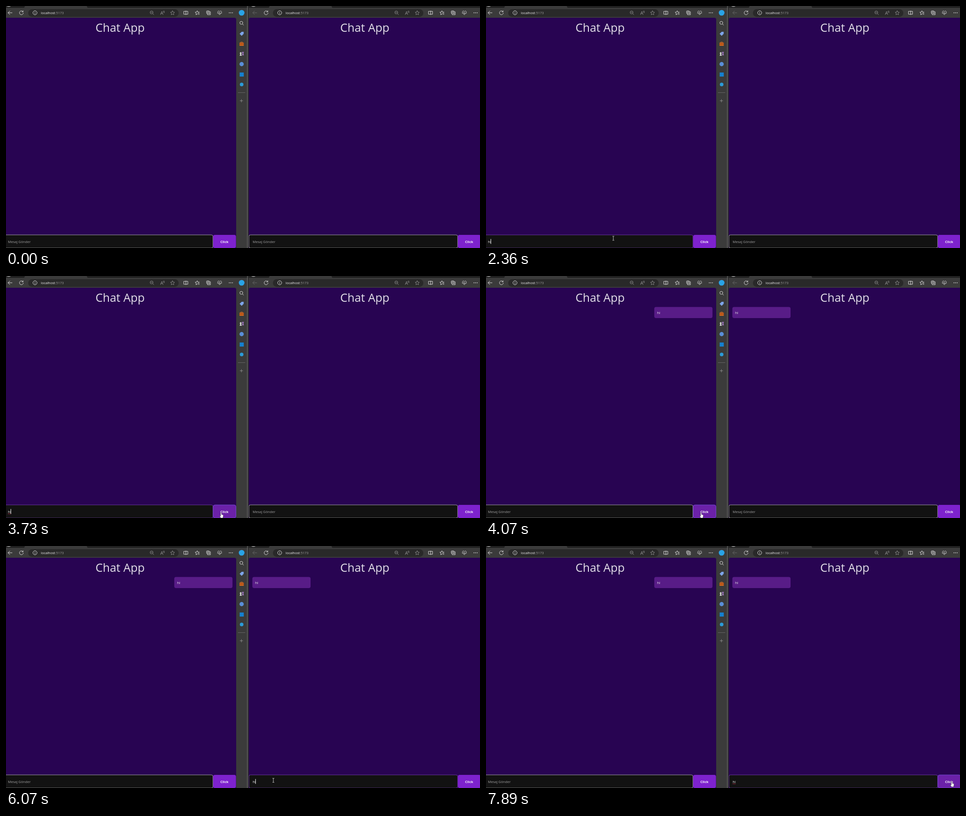
Write an HTML page that moves like this. It is 1046 px wide and 535 px high and loops after 8 s.

```html
<!DOCTYPE html>
<html lang="tr">
<head>
<meta charset="utf-8">
<title>Chat App</title>
<style>
  html, body { margin: 0; width: 100%; height: 100%; overflow: hidden; background: #3b3b3b; }
  svg { display: block; width: 1046px; height: 535px; font: 7.7px "Open Sans", "Noto Sans", sans-serif; }
  text { white-space: pre; }
  .icon { fill: none; stroke: #dadada; stroke-width: 1; stroke-linecap: round; stroke-linejoin: round; }
  .dim { stroke: #888; }
  .off { stroke: #666; }
</style>
</head>
<body>
<svg id="stage" viewBox="0 0 1046 535"></svg>
<script>
const icon = (x, y, d, cls = '') => `<path class="icon ${cls}" transform="translate(${x} ${y})" d="${d}"/>`;
const star = 'M0-4.5 1.4-1.5 4.6-1.1 2.2 1.1 2.8 4.4 0 2.8-2.8 4.4-2.2 1.1-4.6-1.1-1.4-1.5Z';
const lens = 'M2.6-.8A3.3 3.3 0 1 1-4-.8 3.3 3.3 0 1 1 2.6-.8M1.7 1.7 4.2 4.2';

const toolbar = backClass => `
  <rect x="-4" width="540" height="535" fill="#3b3b3b"/>
  <path d="M-4 0H42L40 4H-4ZM178 0H536V4H180Z" fill="#202020"/>
  <ellipse cx="6" cy="-1" rx="5" ry="3" fill="#8a8a8a"/>
  <rect x="49" y="7" width="332" height="17" rx="8.5" fill="#292929"/>
  ${icon(9, 15, 'M4.5 0H-4.5M-.5-4-4.5 0-.5 4', backClass)}
  ${icon(34, 15, 'M3.5-2.5A4.3 4.3 0 1 0 4.3.5M3.8-4.5V-2H1.2')}
  ${icon(64, 15, 'M4.5 0A4.5 4.5 0 1 1-4.5 0 4.5 4.5 0 1 1 4.5 0M0-.3V2.2M0-2.2V-2')}
  <text x="77" y="18" font-size="7.5" fill="#f2f2f2">localhost<tspan fill="#a0a0a0">:5173</tspan></text>
  ${icon(322, 15, lens + 'M-2.2-.8H.8', 'dim')}
  ${icon(345, 15, 'M-4 4-1.2-3 1.6 4M-3 1.7H.6M2-3.5Q3.2-2.2 2.4-.8M3.6-4.4Q5.5-2.3 4.2 0', 'dim')}
  ${icon(367.5, 15, star, 'dim')}
  ${icon(397, 15, 'M-4.3-3.2H4.3V3.2H-4.3ZM0-4.2V4.2')}
  ${icon(422, 15, 'M1 2.5-2.8 4.2-2.2 1-4.6-1.2-1.6-1.6 0-4.4 1.2-1.6H4.6M1.5.8H4.6M2.5 3.2H4.6')}
  ${icon(447, 15, 'M-2.4 1.8H-3.2Q-4.4 1.8-4.4.6V-3Q-4.4-4.2-3.2-4.2H.6Q1.8-4.2 1.8-3M-2-2.2H4.2V4.3H-2ZM1.1-.8V2.8M-.7 1H2.9')}
  ${icon(471.5, 15, 'M-4.3-.8C-5-4-1.5-5 0-2.5 1.5-5 5-4 4.3-.8M-4.8.8H-2L-.8-1 .6 2.2 1.6.8H4.6M-2.2 2.4 0 4.3 1.6 3')}
  ${[492.7, 496.2, 499.7].map(x => `<circle cx="${x}" cy="15" r=".9" fill="#dadada"/>`).join('')}`;

// Each chat window uses the same coordinates, shifted by its own offset.
const pane = (id, dx, page, bubbleX, backClass) => `
  <g transform="translate(${dx} 0)">
    ${toolbar(backClass)}
    <path d="${page}" fill="#280452"/>
    <text x="197.6" y="56.6" font-size="25.4" fill="#e4e0e9">Chat App</text>
    <g id="${id}Bubble">
      <rect x="${bubbleX}" y="68.5" width="128.5" height="24.5" rx="4" fill="#581c87"/>
      <text x="${bubbleX + 6.2}" y="83.7" fill="#eee">hi</text>
    </g>
    <rect id="${id}Input" x="-3.9" y="506" width="460.6" height="29" rx="3.5" fill="#121212" stroke-width=".8"/>
    <text id="${id}Text" x="4.2" y="523.7"></text>
    <path id="${id}Wave" d="M4 526.3l1-1 1 1 1-1 1 1 1-1 1 1 1-1" fill="none" stroke="#c8324b" stroke-width=".8"/>
    <rect id="${id}Caret" y="515" width="1" height="11" fill="#fff"/>
    <rect id="${id}Button" x="457.2" y="506" width="50.3" height="29" rx="4" stroke-width=".8"/>
    <text x="482" y="523.7" font-weight="700" font-size="7.6" text-anchor="middle" fill="#f4eefa">Click</text>
  </g>`;

const sidebar = `
  <rect x="508" width="25" height="535" fill="#3b3b3b"/>
  <path d="M508 0H533V4H508Z" fill="#202020"/>
  <circle cx="520" cy="15" r="6.3" fill="#2aa3e6"/>
  ${icon(520, 38, lens)}
  <path d="M515.5 61.5 520 57H524.5V61.5L520 66Z" fill="#7da4ea"/>
  <path d="M518 81V79.7H522V81" fill="none" stroke="#c9692b"/>
  <path d="M515.3 81H524.7V88H515.3Z" fill="#d0651e"/>
  <path d="M515.3 84H524.7" stroke="#7d3510"/>
  <path d="M515.5 110 517 106A2 2 0 1 1 519 106L520.5 110Z" fill="#cfcfcf"/>
  <path d="M520.5 101.5H525L523.7 105 524.8 109H521L522 105Z" fill="#a47bc4"/>
  <circle cx="520" cy="128.5" r="4.7" fill="#5a8fd8"/>
  <rect x="515.7" y="147" width="9" height="9" fill="#1680d0"/>
  <circle cx="520" cy="173.5" r="4" fill="#2c9bd9"/>
  <path d="M512 191.5H528" stroke="#666"/>
  ${icon(519.5, 209.5, 'M-3 0H3M0-3V3', 'dim')}
  <path d="M532.8 0V535" stroke="#858585"/>
  <path d="M534.5 0V535" stroke="#2b2b2b" stroke-width="2"/>`;

const pointers = `
  <path id="arrow" d="M0 0V10L2.4 7.8 4 11.2 5.4 10.6 3.9 7.3H7Z" fill="#fff" stroke="#222" stroke-width=".5"/>
  <path id="beam" d="M-2-4.5H-.6L0-4 .6-4.5H2M0-4V4M-2 4.5H-.6L0 4 .6 4.5H2" fill="none" stroke="#ddd" stroke-width=".9"/>
  <path id="hand" d="M-1 1Q0-.6 1 1V4.5L4.6 5.5Q5.3 6 5 8L4 12.5H-.3L-3 8.3Q-2.8 7-1 8.4Z" fill="#fff" stroke="#222" stroke-width=".5"/>
  <circle id="halo" r="8.3" fill="#ff0" opacity=".5"/>`;

document.getElementById('stage').innerHTML =
  pane('left', 0, 'M-4 535V26H504Q508 26 508 30V535Z', 371.3, '') + sidebar +
  `<svg x="535.5" width="510.5" height="535" viewBox="535.5 0 510.5 535" style="width:510.5px">${
    pane('right', 540, 'M-4.5 535V30Q-4.5 26-.5 26H510V535Z', 3.6, 'off')}</svg>` + pointers;

const el = id => document.getElementById(id);
const set = (id, attrs) => { for (const k in attrs) el(id).setAttribute(k, attrs[k]); };
const show = (id, on) => set(id, { visibility: on ? 'visible' : 'hidden' });
const within = (t, a, b) => t >= a && t < b;

// Pointer waypoints: time, x, y
const path = [
  [70, 787, 507], [230, 643, 482], [430, 643, 482], [620, 314, 484], [830, 314, 484],
  [1020, 281, 513.5], [2860, 281, 513.5], [3660, 474.5, 522.5], [4200, 474.5, 522.5],
  [4720, 590, 518], [6900, 590, 518], [7220, 791, 518], [7500, 791, 518], [7890, 1027.7, 520]
];
const clicks = [[1290, 1510, 280, 513], [3790, 3960, 475, 523], [4730, 4980, 588.5, 517.5]];

const chats = [
  { id: 'left', dx: 0, focus: 1360, h: 2230, hi: 2360, wave: 3730, blur: 3790, sent: 3930, bubble: 3930 },
  { id: 'right', dx: 540, focus: 4780, h: 5910, hi: 6070, wave: 7080, blur: 9000, sent: 9000, bubble: 4000 }
];

function pointerAt(t) {
  const i = path.findIndex(p => p[0] > t);
  if (i < 0) return path[path.length - 1].slice(1);
  if (!i) return path[0].slice(1);
  const [t0, x0, y0] = path[i - 1], [t1, x1, y1] = path[i];
  const k = (t - t0) / (t1 - t0);
  return [x0 + (x1 - x0) * k, y0 + (y1 - y0) * k];
}

function drawChat(c, t, x, y) {
  const value = !within(t, c.h, c.sent) ? '' : t < c.hi ? 'h' : 'hi';
  const focused = within(t, c.focus, c.blur);
  const lastKey = [c.hi, c.h, c.focus].find(k => t >= k);
  const hover = y > 506 && within(x - c.dx, 457, 508);
  el(c.id + 'Text').textContent = value || 'Mesaj Gönder';
  set(c.id + 'Text', { fill: value ? '#f2f2f2' : '#a0a0a0' });
  set(c.id + 'Input', { stroke: focused ? '#7e3fbd' : '#c4c4c4' });
  set(c.id + 'Button', { fill: hover ? '#6b21a8' : '#7e22ce', stroke: hover ? '#7a55e0' : 'none' });
  set(c.id + 'Caret', { x: [4, 8.3, 10.2][value.length] });
  show(c.id + 'Caret', focused && (t - lastKey) % 1070 < 535);
  show(c.id + 'Wave', within(t, c.wave, c.sent));
  show(c.id + 'Bubble', t >= c.bubble);
}

function draw(t) {
  const [x, y] = pointerAt(t);
  const paneX = x < 533 ? x : x - 540;
  const kind = y < 506 || within(x, 508, 536) ? 'arrow' : paneX < 457 ? 'beam' : 'hand';
  for (const id of ['arrow', 'beam', 'hand']) {
    set(id, { transform: `translate(${x} ${y})` });
    show(id, t >= 70 && id === kind);
  }
  const click = clicks.find(([a, b]) => within(t, a, b));
  show('halo', click);
  if (click) set('halo', { cx: click[2], cy: click[3] });
  for (const c of chats) drawChat(c, t, t < 70 ? 0 : x, y);
}

const start = performance.now();
function tick() {
  draw((performance.now() - start) % 8000);
  requestAnimationFrame(tick);
}
tick();
</script>
</body>
</html>
```
